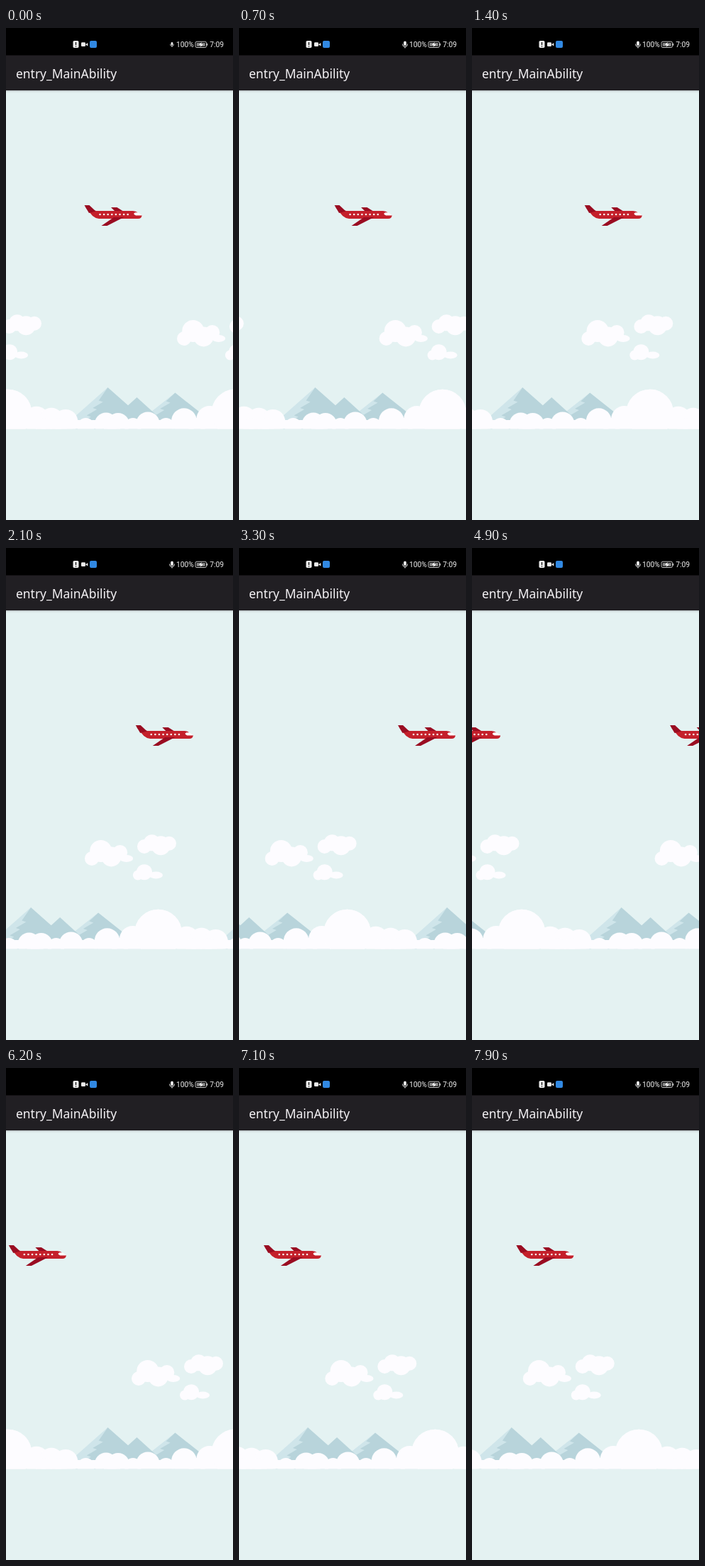
Write an HTML page that moves like this. It is 320 px wide and 694 px high and loops after 8 s.

```html
<!DOCTYPE html>
<html lang="en">
<head>
<meta charset="utf-8">
<title>Flight</title>
<style>
  html, body { margin: 0; width: 100%; height: 100%; overflow: hidden; background: #e4f2f2; }
  svg { display: block; width: 100%; height: 100%; }
  .title { font: 17.45px "Noto Sans", sans-serif; fill: #f4f2f5; }
  .status { font: 10.3px Roboto, sans-serif; fill: #efefef; }
  .cloud { fill: #fdfcff; }
  .light { fill: #cfe5ea; }
  .dark { fill: #b8d4db; }
  .red { fill: #c4202b; }
  .wing { fill: #9a0d22; }
</style>
</head>
<body>
<svg viewBox="0 0 320 694">
  <defs>
    <linearGradient id="shade" x1="0" y1="0" x2="0" y2="1">
      <stop offset="0" stop-color="#bcc5c8"/>
      <stop offset="1" stop-color="#e4f2f2"/>
    </linearGradient>

    <g id="plane">
      <path class="wing" d="M148 253H156.500L166 259H154Z"/>
      <path class="red" d="M112 253L127 258H179Q183 258 186 260.500H182Q179 262 183 264.300H191.500Q191.500 269 186 269H131Q126 268.500 122 265Z"/>
      <path class="wing" d="M110.500 250H117.500L126.500 258.500L117 261Z"/>
      <path class="wing" d="M134.500 279L152 267H166L142.500 279Z"/>
      <path d="M182 260.500H186Q189.500 261.500 191.300 264.300H183Q178 262 182 260.500Z" fill="#fff"/>
      <path d="M132.500 263H173" stroke="#fbeff0" stroke-width="2.700" stroke-linecap="round" stroke-dasharray="0 5.600"/>
    </g>
    <g id="sky" class="cloud"></g>
    <g id="land"></g>

    <clipPath id="ground"><rect y="88" width="320" height="477.500"/></clipPath>
  </defs>

  <rect width="320" height="694" fill="#e4f2f2"/>
  <g clip-path="url(#ground)">
    <g data-layer="land"></g>
    <g data-layer="sky"></g>
    <g data-layer="plane"></g>
  </g>

  <rect y="88" width="320" height="3" fill="url(#shade)"/>
  <rect y="38" width="320" height="50" fill="#211f23"/>
  <rect width="320" height="38.500" fill="#000"/>
  <text class="title" x="14" y="70.500">entry_MainAbility</text>

  <rect x="94.500" y="18" width="8" height="10" rx="1.800" fill="#eee"/>
  <path d="M98.500 20V24M98.500 25.200V26.500" stroke="#111" stroke-width="1.300"/>
  <rect x="106" y="20.300" width="6" height="5.800" rx="1.300" fill="#eee"/>
  <path d="M112 23.200L115.300 21V25.500Z" fill="#eee"/>
  <rect x="118" y="18" width="10" height="10" rx="2" fill="#3189e3"/>

  <g id="mic" fill="#efefef">
    <rect x="-1.900" y="-5" width="3.800" height="6.500" rx="1.900"/>
    <path d="M-3.500 -1Q-3.500 3 0 3T3.500 -1M0 3V5" fill="none" stroke="#efefef"/>
  </g>
  <text class="status" x="240" y="27">100%</text>
  <rect x="267" y="19.200" width="15.500" height="8.300" rx="2" fill="none" stroke="#ddd" stroke-width=".9"/>
  <rect x="268.700" y="20.900" width="12.100" height="4.900" rx=".8" fill="#888"/>
  <path d="M275.700 20L271.800 23.800H274.600L273.800 26.800L278 22.900H275.100Z" fill="#fff"/>
  <path d="M283.700 21.800V24.800" stroke="#ddd" stroke-width="1.100"/>
  <text class="status" x="287.300" y="27">7:09</text>
</svg>
<script>
  const WIDTH = 320, LOOP = 8000, STEP = 100, GROUND = 565.5;
  const NS = "http://www.w3.org/2000/svg";
  const $ = id => document.getElementById(id);

  function add(parent, tag, attrs) {
    const el = document.createElementNS(NS, tag);
    for (const key in attrs) el.setAttribute(key, attrs[key]);
    return parent.appendChild(el);
  }

  const puff = (parent, cx, cy, rx, ry = rx) => add(parent, "ellipse", { cx, cy, rx, ry });
  const shape = (kind, points) => add($("land"), "polygon", { class: kind, points: points.join(" ") });

  // Overlapping puffs from left to right that bob around y, less and less.
  function cloud(x, y, lift, radii, tail) {
    radii.forEach((r, i) => {
      if (i) x += (radii[i - 1] + r) / 2;
      puff($("sky"), x, y + lift * (-0.75) ** i, r);
    });
    if (tail) puff($("sky"), x + 9, y + lift, 9.5, 5);
  }

  // A lit left side, and a dark right side with a saw-toothed edge.
  function mountain(x, y, slope, snow) {
    const drop = GROUND - y, reach = drop * slope;
    if (snow) shape("light", [[x, y], [x - reach, GROUND], [x, GROUND]]);
    const edge = [];
    for (let i = 0; snow && i < 3; i++) {
      const left = x - 12.8 - 8.5 * i, down = y + snow + 10.5 * i;
      edge.push([left, down], [left + 6, down + 2]);
    }
    const foot = snow ? x - 0.75 * reach : x - reach;
    shape("dark", [[x, y], ...edge, [foot, GROUND], [x + reach, GROUND]]);
  }

  // Big bumps that sink towards the middle, with a small one in each gap.
  function bank(centres) {
    const group = add($("land"), "g", { class: "cloud" });
    centres.forEach((x, i) => {
      const swell = Math.cos(2 * Math.PI * x / WIDTH);
      puff(group, x, 555 - 4 * swell, 17.5 + 1.5 * swell);
      if (i) puff(group, (x + centres[i - 1]) / 2, 562, 12);
    });
    for (const x of [3, 3 + WIDTH]) puff(group, x, 543, 33.3);
    add(group, "rect", { y: 553, width: WIDTH + 0.5, height: GROUND - 553 });
  }

  cloud(251, 432, 6, [10, 15.5, 14, 10.5], true);
  cloud(325, 418, 3, [10, 11.5, 13.5, 10], false);
  cloud(316, 459, 2.5, [7, 11, 4], true);

  mountain(143.5, 507, 1.13, 18.5);
  mountain(238.5, 514.5, 1.26, 12);
  mountain(184.5, 521, 1.1, 0);
  bank([43, 64, 84, 141, 158, 200, 251, 287]);

  // Time in ms to cross the whole width; the sign gives the direction.
  const periods = { land: -6200, sky: -5167, plane: 9300 };
  const layers = Object.entries(periods).map(([name, period]) => {
    const el = document.querySelector(`[data-layer=${name}]`);
    for (const x of [-WIDTH, 0, WIDTH]) add(el, "use", { href: "#" + name, x });
    return { el, period };
  });

  function draw(t) {
    for (const { el, period } of layers) {
      const x = (t / period * WIDTH) % WIDTH;
      el.setAttribute("transform", `translate(${x.toFixed(2)} 0)`);
    }
    const size = t < 400 ? 0.72 : 1;
    $("mic").setAttribute("transform", `translate(234 23.5) scale(${size})`);
  }

  const start = performance.now();
  function tick() {
    const t = (performance.now() - start) % LOOP;
    draw(Math.floor(t / STEP) * STEP);
    requestAnimationFrame(tick);
  }
  tick();
</script>
</body>
</html>
```
